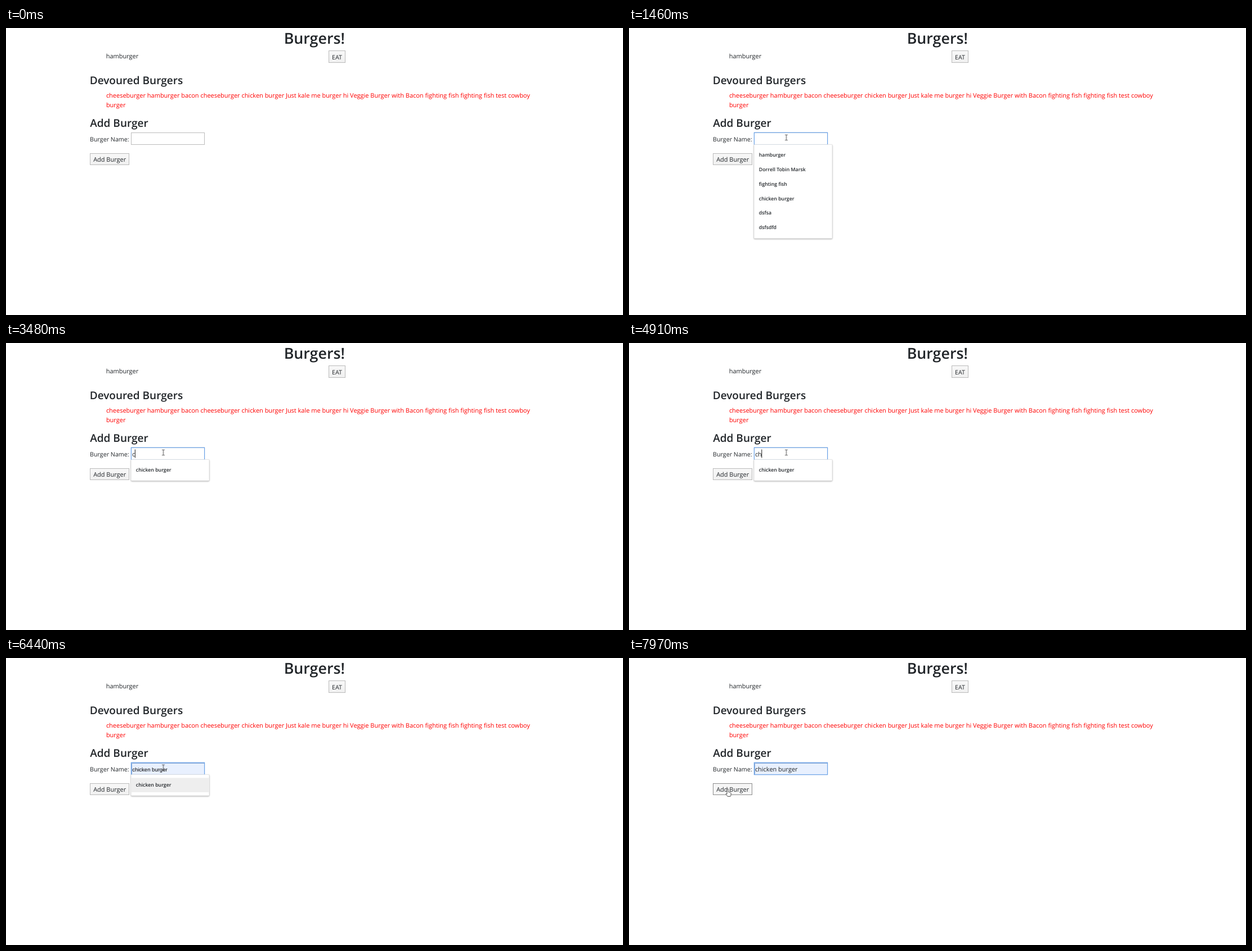
Recreate the animation shown at these times as an HTML page. Size 1096x511 px, loop 8 s.

```html
<!DOCTYPE html>
<html lang="en">
<head>
<meta charset="utf-8">
<title>Burgers</title>
<style>
  html, body { margin: 0; width: 100%; height: 100%; overflow: hidden; background: #fff; }
  svg { display: block; width: 1096px; height: 511px; }
  text { font: 10.97px "Open Sans", "Noto Sans", sans-serif; fill: #212529; white-space: pre; text-rendering: geometricPrecision; }
  .title { font-size: 26.8px; font-weight: 600; text-anchor: middle; }
  .head { font-size: 19px; font-weight: 600; }
  .label { font-size: 10.7px; }
  .eaten { fill: #f00; }
  .middle { text-anchor: middle; }
  .plain { font: 9.52px "Liberation Sans", Arial, sans-serif; fill: #000; }
  .menu text { font-size: 8.75px; font-weight: 600; }
  .menu .sheet { fill: #fff; stroke: #d4d4d4; stroke-width: .6; filter: drop-shadow(0 1px 1px rgba(0, 0, 0, .3)); }
  .button { fill: url(#face); stroke: #bababa; }
  .hover { fill: #f6f6f6; stroke: #8c8c8c; }
  .field { fill: #fff; stroke: #bcbcbc; }
  .ring { fill: none; stroke: #68a0e6; stroke-width: 1.2; }
  .tint { fill: #e8f0fe; }
  .inset { fill: none; stroke: #8aa9d4; }
  .caret { stroke: #000; stroke-width: .9; }
  .beam { fill: none; stroke: #333; stroke-width: .9; }
  .shape { fill: #fff; stroke: #333; stroke-width: .9; stroke-linejoin: round; }

  /* One shared 8 s clock; every change is a hard cut. */
  .anim { opacity: 0; animation: 8s step-end infinite; }
  .ring.anim { animation-name: focus; }
  .full { animation-name: full; }
  .short { animation-name: short; }
  .picked { animation-name: picked; }
  .filled { animation-name: filled; }
  .one { animation-name: one; }
  .two { animation-name: two; }
  .preview { animation-name: preview; }
  .final { animation-name: final; }
  .caret.anim { animation-name: blink; }
  .pointer { animation: move 8s step-end infinite; }
  .arrow { animation-name: arrow; }
  .beam.anim { animation-name: beam; }
  .hand, .hover { animation-name: hand; }

  @keyframes focus { 11.125% { opacity: 1 } }
  @keyframes full { 12.25% { opacity: 1 } 43.5% { opacity: 0 } }
  @keyframes short { 43.5% { opacity: 1 } 87.375% { opacity: 0 } }
  @keyframes picked { 80.5% { opacity: 1 } 87.375% { opacity: 0 } }
  @keyframes filled { 80.5% { opacity: 1 } }
  @keyframes one { 43.5% { opacity: 1 } 48.5% { opacity: 0 } }
  @keyframes two { 48.5% { opacity: 1 } 80.5% { opacity: 0 } }
  @keyframes preview { 80.5% { opacity: 1 } 88.5% { opacity: 0 } }
  @keyframes final { 88.5% { opacity: 1 } }
  @keyframes blink {
    11.125% { opacity: 1 }
    18.25% { opacity: 0 }
    24.25% { opacity: 1 }
    31.25% { opacity: 0 }
    37.5% { opacity: 1 }
    43.5% { opacity: 1; transform: translateX(4.8px) }
    48.5% { opacity: 1; transform: translateX(11.3px) }
    55.375% { opacity: 0; transform: translateX(11.3px) }
    61.375% { opacity: 1; transform: translateX(11.3px) }
    68.375% { opacity: 0; transform: translateX(11.3px) }
    74.25% { opacity: 1; transform: translateX(11.3px) }
    80.5% { opacity: 0; transform: translateX(74px) }
    88.5% { opacity: 1; transform: translateX(74px) }
    94.75% { opacity: 0; transform: translateX(74px) }
  }
  @keyframes arrow {
    .875% { opacity: 1 }
    8.475% { opacity: 0 }
    96.25% { opacity: 1 }
    99.625% { opacity: 0 }
  }
  @keyframes beam { 8.475% { opacity: 1 } 96.25% { opacity: 0 } }
  @keyframes hand { 99.625% { opacity: 1 } }
  @keyframes move {
    .875% { transform: translate(903px, 452px) }
    1.825% { transform: translate(847px, 429px) }
    2.775% { transform: translate(766px, 395px) }
    3.725% { transform: translate(666px, 354px) }
    4.675% { transform: translate(566px, 313px) }
    5.625% { transform: translate(479px, 277px) }
    6.575% { transform: translate(404px, 246px) }
    7.525% { transform: translate(348px, 224px) }
    8.475% { transform: translate(310px, 206px) }
    9.425% { transform: translate(288px, 199px) }
    10.375% { transform: translate(279.5px, 195.5px) }
    11.125% { transform: translate(279.5px, 195px) }
    96.25% { transform: translate(262px, 208px) }
    97.125% { transform: translate(222px, 232px) }
    98% { transform: translate(186px, 252px) }
    98.875% { transform: translate(174px, 246px) }
    99.625% { transform: translate(175.5px, 234px) }
  }
</style>
</head>
<body>
<svg viewBox="0 0 1096 511">
  <defs>
    <linearGradient id="face" x2="0" y2="1">
      <stop stop-color="#f8f8f8"/>
      <stop offset="1" stop-color="#f0f0f0"/>
    </linearGradient>
  </defs>

  <text class="title" x="547.8" y="28.3">Burgers!</text>
  <text x="177.7" y="53.6">hamburger</text>
  <rect class="button" x="573.5" y="40.5" width="29" height="21"/>
  <text class="middle label" x="588" y="55.6">EAT</text>

  <text class="head" x="148.7" y="100.1">Devoured Burgers</text>
  <text class="eaten" x="177.9" y="123.6">cheeseburger hamburger bacon cheeseburger chicken burger Just kale me burger hi Veggie Burger with Bacon fighting fish fighting fish test cowboy</text>
  <text class="eaten" x="177.9" y="140.8">burger</text>

  <text class="head" x="149.2" y="176.1">Add Burger</text>
  <text class="label" x="149.1" y="201.7">Burger Name:</text>
  <rect class="button" x="149.5" y="223.5" width="69" height="20"/>
  <rect class="anim hover" x="149.5" y="223.5" width="69" height="20"/>
  <text class="middle" x="184.2" y="238.2">Add Burger</text>

  <rect class="field" x="222.5" y="186.5" width="130" height="21"/>
  <g class="anim filled">
    <rect class="tint" x="222" y="186" width="131" height="22"/>
    <path class="inset" d="M223.5 207V187.5H352"/>
  </g>
  <rect class="anim ring" x="222.4" y="186.2" width="130.2" height="21.5"/>
  <text class="anim one" x="223.9" y="201.8">c</text>
  <text class="anim two" x="223.9" y="201.8">ch</text>
  <text class="anim preview plain" x="224.2" y="201.6">chicken burger</text>
  <text class="anim final" x="223.9" y="201.8">chicken burger</text>
  <path class="anim caret" d="M224.5 189.5V204.5"/>

  <g class="anim menu full">
    <rect class="sheet" x="222" y="207.3" width="139" height="167.5" rx="1.5"/>
    <text x="230.8" y="229.2">hamburger</text>
    <text x="230.8" y="255">Dorrell Tobin Marsk</text>
    <text x="230.8" y="280.8">fighting fish</text>
    <text x="230.8" y="306.6">chicken burger</text>
    <text x="230.8" y="332.4">dsfsa</text>
    <text x="230.8" y="358.2">dsfsdfd</text>
  </g>
  <g class="anim menu short">
    <rect class="sheet" x="222" y="207.3" width="139" height="37.9" rx="1.5"/>
    <rect class="anim picked" x="222.4" y="213.4" width="138" height="25.6" fill="#eee"/>
    <text x="230.8" y="229.2">chicken burger</text>
  </g>

  <g class="pointer">
    <path class="anim arrow shape" d="M0 0V12L2.8 9.4 4.7 13.8 6.6 13 4.7 8.7H8.6Z"/>
    <path class="anim beam" d="M-2.3-4.8H-.7L0-4.2 .7-4.8H2.3M0-4.2V4.2M-2.3 4.8H-.7L0 4.2 .7 4.8H2.3"/>
    <path class="anim hand shape" d="M-1.5 8.2V.3A1.3 1.3 0 0 1 1.1 .3V4.6L2.8 4.9 4.4 5.4 5.6 6.4V9.6L4.6 12.4H-.4L-3.4 8.4Q-3.3 6.6-1.5 8.2Z"/>
  </g>
</svg>
</body>
</html>
```
